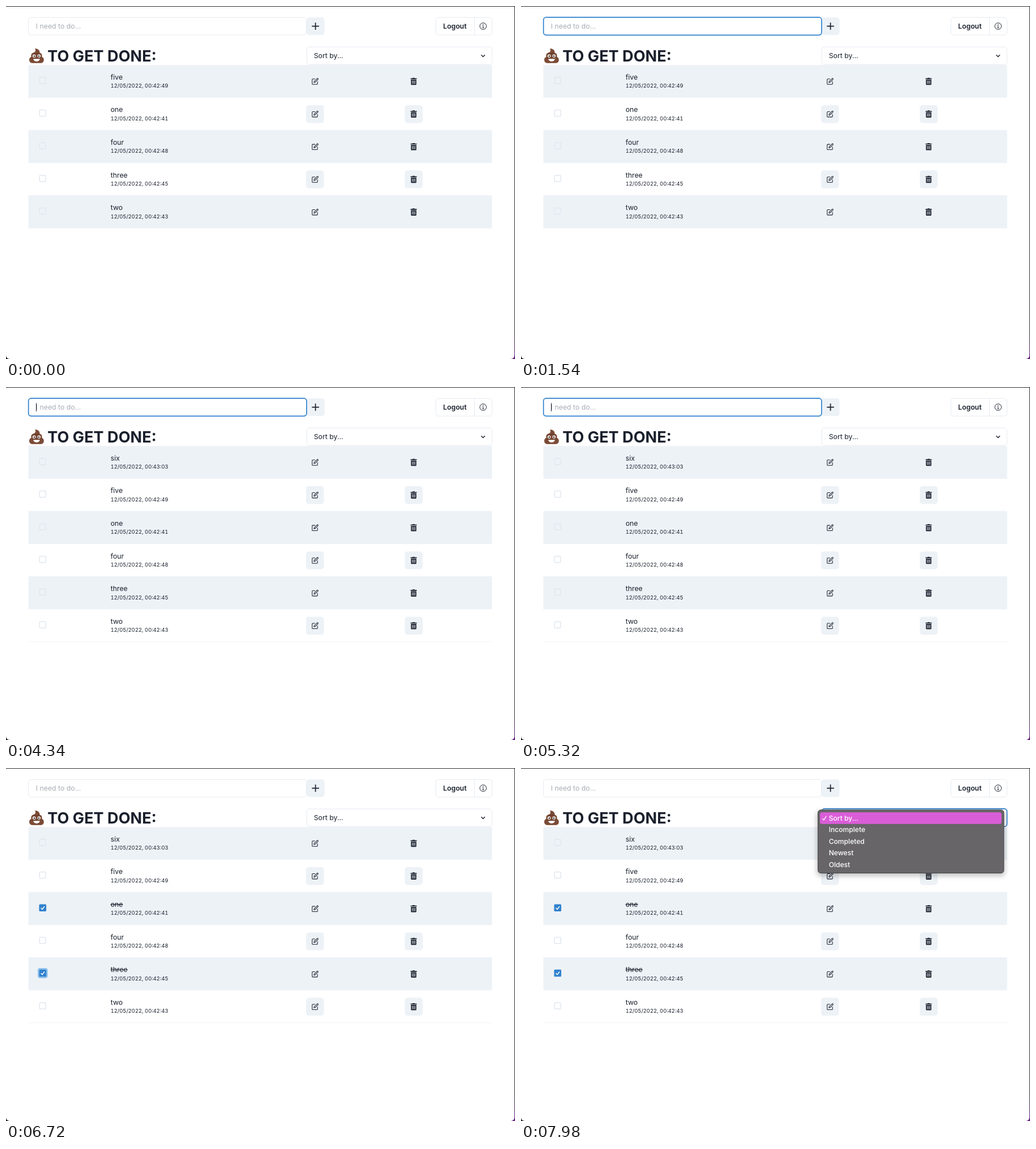
Write an HTML page that moves like this. It is 899 px wide and 623 px high and loops after 8000 ms.

```html
<!DOCTYPE html>
<html lang="en">
<head>
<meta charset="utf-8">
<title>To-do list</title>
<style>
  html, body { margin: 0; width: 100%; height: 100%; overflow: hidden; background: #fff; }
  svg { display: block; width: 899px; height: 623px; }
  text { font: 12.3px Inter, "Liberation Sans", sans-serif; fill: #1a202c; white-space: pre; }
  text.title { font-size: 27.1px; font-weight: 700; }
  text.bold { font-weight: 600; }
  text.date { font-size: 9.4px; font-variant-numeric: tabular-nums; }
  text.hint { fill: #a8adb4; }
  text.done { text-decoration: line-through; }
  text.option { font-size: 12.1px; font-weight: 500; fill: #fff; }
</style>
</head>
<body>
<svg id="stage" viewBox="0 0 899 623">
  <defs>
    <g id="edit" fill="none" stroke="#1a202c" stroke-width="2" stroke-linecap="round" stroke-linejoin="round"
       transform="scale(.525) translate(-12 -12)">
      <path d="M11 4H4a2 2 0 0 0-2 2v14a2 2 0 0 0 2 2h14a2 2 0 0 0 2-2v-7"/>
      <path d="M18.5 2.5a2.1 2.1 0 0 1 3 3L12 15l-4 1 1-4z"/>
    </g>
    <path id="trash" fill="#1a202c" fill-rule="evenodd" transform="scale(.0246) translate(-224 -256)"
      d="M0 48q0-16 16-16h120l20-32h136l20 32h120q16 0 16 16v48H0z
         M32 128h384v336q0 48-48 48H80q-48 0-48-48z
         M112 200h40v240h-40z M204 200h40v240h-40z M296 200h40v240h-40z"/>
    <filter id="soft" x="-10%" y="-20%" width="120%" height="150%"><feGaussianBlur stdDeviation="4"/></filter>
    <linearGradient id="edge" x2="0" y2="1">
      <stop offset=".93" stop-color="#2b2a2e"/><stop offset="1" stop-color="#6a1a86"/>
    </linearGradient>
  </defs>
  <rect width="899" height="623" fill="url(#edge)"/>
  <rect y="560" width="450" height="63" fill="#17171a"/>
  <path fill="#fff" d="M0 1H898V616q0 7-7 7H7q-7 0-7-7z"/>

  <rect x="531" y="20" width="31.5" height="31.3" rx="4.7" fill="#edf2f7"/>
  <path d="M540.3 35.6h12.6M546.6 29.3v12.6" stroke="#1a202c" stroke-width="1.7"/>

  <g>
    <path fill="#7b4b36" d="M51 75c5 0 9 3 8.600 7.500 3.400 1 4.800 4 3.600 7 4.800 1.500 5.600 10.500-1.500 11.300H46.300c-7-.8-6.500-9.800-1.500-11.300-1.200-3 .3-6.500 4-7.200 3-1 4.500-4 2.200-7.300z"/>
    <path d="M48 83.500q6 1.500 11-1M45 91.500q9 3 18-2" fill="none" stroke="#5d3625" stroke-width="1"/>
    <g fill="#fff"><circle cx="49.700" cy="88.300" r="2.700"/><circle cx="58.300" cy="88.300" r="2.700"/>
      <path d="M48 93.300h12q-1.500 4.500-6 4.500t-6-4.500z"/></g>
    <g fill="#261a17"><circle cx="50" cy="88.500" r="1.300"/><circle cx="58" cy="88.500" r="1.300"/></g>
  </g>
  <text class="title" x="73.300" y="97.800">TO GET DONE:</text>
  <g id="live"></g>
</svg>
<script>
const LOOP = 8000, PITCH = 57.65;
const BLUE = '#3182ce', GREY = '#e2e8f0', STRIPE = '#edf2f7';
const live = document.getElementById('live');

const items = [
  ['six', '43:03'], ['five', '42:49'], ['one', '42:41'],
  ['four', '42:48'], ['three', '42:45'], ['two', '42:43']
];
const ticked = { one: 5530, three: 6510 };
const blurred = { one: 6510, three: 7840 };
const options = ['Sort by...', 'Incomplete', 'Completed', 'Newest', 'Oldest'];
const caretOn = [[1050, 1540], [2100, 3500], [4060, 4550], [5110, 5530]];

const ramp = (t, start, ms = 200) => Math.max(0, Math.min(1, (t - start) / ms));
const pulse = (t, from, to, ms) => ramp(t, from, ms) - ramp(t, to, ms);
const text = (x, y, s, cls = '') => `<text x="${x}" y="${y}" class="${cls}">${s}</text>`;
const rect = (x, y, w, h, r, attrs) =>
  `<rect x="${x}" y="${y}" width="${w}" height="${h}" rx="${r}" ${attrs}/>`;
const outline = (color, width = .9, opacity = 1) =>
  `fill="none" stroke="${color}" stroke-width="${width}" opacity="${opacity}"`;

function typed(t) {
  if (t < 2520 || t >= 3430) return '';
  return t < 2590 ? 's' : t < 3010 ? 'si' : 'six';
}

function input(t) {
  const value = typed(t);
  const caretX = { '': 53.5, s: 60, si: 62.5, six: 68.5 }[value];
  const showCaret = caretOn.some(([a, b]) => t >= a && t < b);
  return rect(39.7, 20.2, 491, 31, 4.7, outline(GREY)) +
    rect(39.7, 19.9, 491.2, 31.4, 4.7, outline(BLUE, 1.7, pulse(t, 910, 5530))) +
    text(52.7, 40.3, value || 'I need to do...', value ? '' : 'hint') +
    (showCaret ? `<path d="M${caretX} 28.3v14.700" stroke="#1a202c"/>` : '');
}

function account(t) {
  const info = pulse(t, 7070, 7210, 140), logout = pulse(t, 7210, 7450, 100);
  return rect(759.3, 20.3, 68, 30.8, 4.7, `fill="${STRIPE}" opacity="${logout}"`) +
    rect(827.6, 20.3, 30.8, 30.8, 4.7, `fill="${STRIPE}" opacity="${info}"`) +
    rect(759.2, 20.2, 99.2, 31, 4.7, outline(GREY)) +
    `<path d="M827.5 20.2v31" stroke="${GREY}" stroke-width=".9"/>` +
    text(772, 39.7, 'Logout', 'bold') +
    `<g fill="none" stroke="#1a202c"><circle cx="842.7" cy="35.6" r="5.8"/>
     <path d="M841.5 34.600h1.300v4M841.200 38.600h3.200" stroke-width=".9"/></g>
     <circle cx="842.6" cy="32.6" r=".8" fill="#1a202c"/>`;
}

function select(t) {
  return rect(531.2, 72.2, 327.2, 31, 4.7, outline(t < 7600 ? GREY : '#cbd5e0')) +
    rect(531.2, 71.9, 327.2, 31.5, 4.7, outline(BLUE, 1.7, ramp(t, 7800, 140))) +
    text(543.7, 91.6, 'Sort by...') +
    '<path d="M839.300 86.200l3.300 3.300 3.300-3.300" fill="none" stroke="#1a202c" stroke-width="1.400"/>';
}

function checkbox(t, name, y) {
  const start = ticked[name] ?? Infinity;
  const on = ramp(t, start), ring = pulse(t, start, blurred[name] ?? Infinity, 140);
  return rect(59.3, y - 5.5, 11, 11, 1.2, outline(GREY, 1.5)) + (on ?
    rect(57.3, y - 7.5, 15, 15, 2.5, outline('#4299e1', 2.4, .6 * ring)) +
    `<g opacity="${on}">` + rect(58.5, y - 6.3, 12.6, 12.6, 1.6, `fill="${BLUE}"`) +
    `<path d="M61.700 ${y + .3}l2.300 2.400 4-5.200" fill="none" stroke="#fff" stroke-width="1.500"/></g>` : '');
}

function row(t, [name, time], i) {
  const dy = i * PITCH, top = 104.2 + dy, mid = 133 + dy;
  const button = x => rect(x, mid - 15.7, 31.5, 31.5, 4.7, `fill="${STRIPE}"`);
  const done = t >= (ticked[name] ?? Infinity) + 70;
  return (i % 2
    ? rect(39.5, top + PITCH - .9, 819, .9, 0, `fill="${STRIPE}"`) + button(530) + button(704.4)
    : rect(39.5, top, 819, PITCH, 0, `fill="${STRIPE}"`)) +
    checkbox(t, name, 131.4 + dy) +
    text(184.7, 129.7 + dy, name, done ? 'done' : '') +
    text(184.7, 143.9 + dy, `12/05/2022, 00:${time}`, 'date') +
    `<use href="#edit" x="546" y="${mid}"/><use href="#trash" x="720" y="${mid}"/>`;
}

function menu() {
  return rect(522, 76, 333, 115, 7, 'fill="#000" opacity=".22" filter="url(#soft)"') +
    rect(524.5, 74, 328.3, 111.5, 5, 'fill="#676568" stroke="#454447"') +
    rect(528, 78.3, 320.7, 20.5, 3.5, 'fill="#da5dd8"') +
    '<path d="M532.500 88.800l2.400 3 4.300-7" fill="none" stroke="#fff" stroke-width="1.300"/>' +
    options.map((name, i) => text(543.7, 92.6 + 20.5 * i, name, 'option')).join('');
}

let last = '';
function frame(now) {
  const t = now % LOOP;
  const list = t < 3500 ? items.slice(1) : items;
  const html = list.map((item, i) => row(t, item, i)).join('') +
    input(t) + account(t) + select(t) + (t >= 7910 ? menu() : '');
  if (html !== last) live.innerHTML = last = html;
  requestAnimationFrame(frame);
}
frame(0);
</script>
</body>
</html>
```
